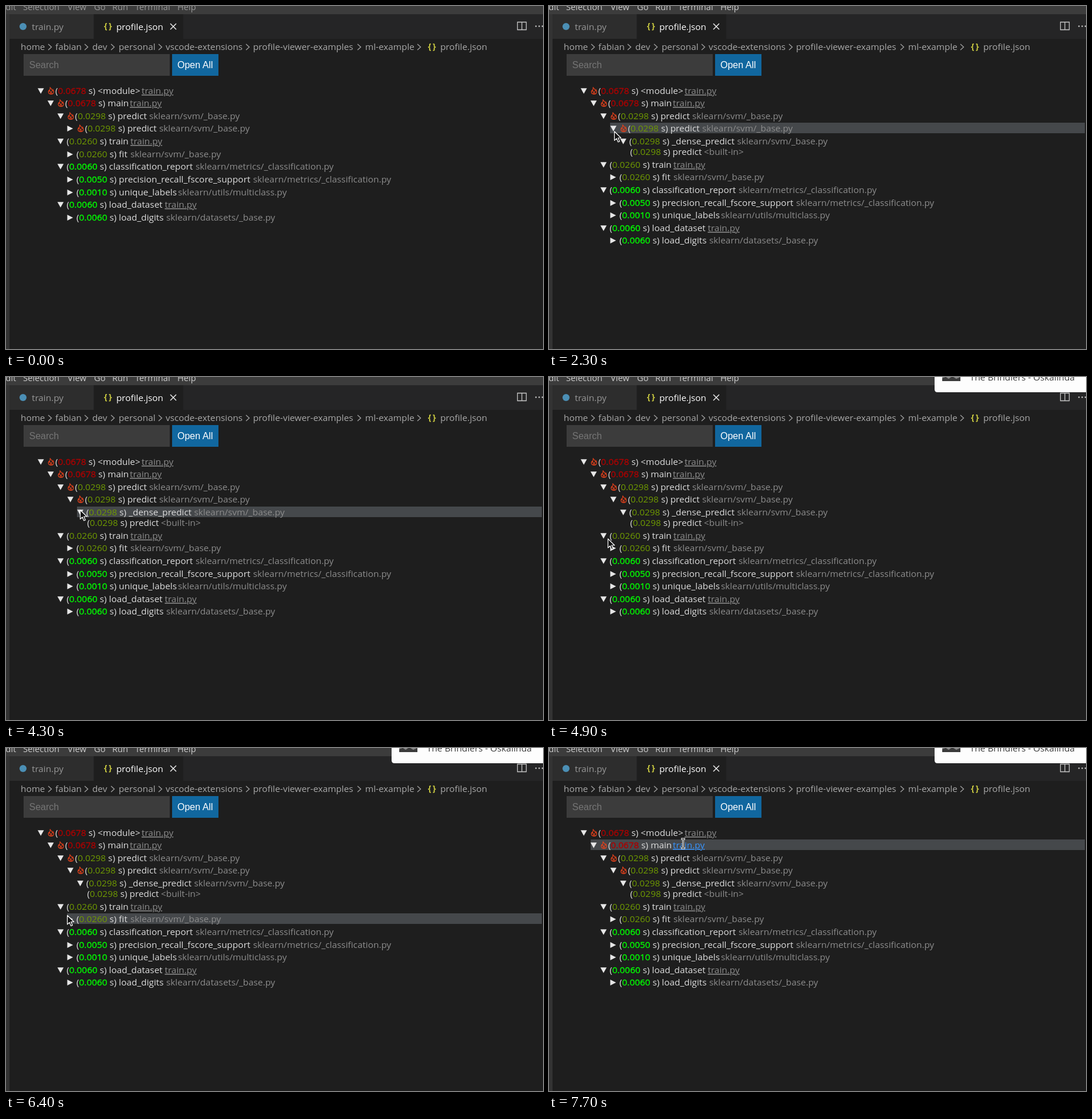
An HTML page that plays this animation: 915x585 px, repeating every 8 s.

```html
<!DOCTYPE html>
<html lang="en">
<head>
<meta charset="utf-8">
<title>Profile viewer</title>
<style>
  html, body { margin: 0; width: 100%; height: 100%; overflow: hidden; background: #1e1e1e; }
  svg { display: block; width: 915px; height: 585px; }
  text { font: 15.3px "Open Sans", "Noto Sans", sans-serif; white-space: pre; }
  .menu text { font-size: 14.7px; }
  .crumb { fill: #a9a9a9; }
  .json { font-weight: 700; font-size: 14px; letter-spacing: 2.6px; fill: #cbcb41; }
  .form { font: 16px "Liberation Sans", Arial, sans-serif; }
  .row text { font-size: 15.35px; fill: #dcdcdc; }
  .row .file { fill: #8c8c8c; }
  .row .link { text-decoration: underline; }
  .row .over { fill: #3794ff; }
  .strong { stroke-width: .35px; }
</style>
</head>
<body>
<svg id="stage" viewBox="0 0 915 585">
  <rect width="915" height="585" fill="#1e1e1e"/>
  <rect y="13" width="6" height="572" fill="#333"/>
  <rect x="6" y="13" width="909" height="43" fill="#252526"/>
  <rect x="6" y="13" width="143" height="43" fill="#2d2d2d"/>
  <rect x="150" y="13" width="152" height="43" fill="#1e1e1e"/>
  <rect width="915" height="14" fill="#3c3c3c"/>
  <g class="menu" id="menu"></g>

  <circle cx="29" cy="35" r="6" fill="#4b8fb5"/>
  <text x="44" y="41" fill="#979797">train.py</text>
  <text class="json" x="167" y="39">{}</text>
  <text x="188" y="41" fill="#fff">profile.json</text>
  <path d="M280 30l10 10M290 30l-10 10" stroke="#e8e8e8" stroke-width="1.5"/>
  <path d="M871.5 27.5h15v13h-15zM879 27.5v13" fill="none" stroke="#c5c5c5" stroke-width="1.3"/>
  <g fill="#c5c5c5"><circle cx="903" cy="34.5" r="1.3"/><circle cx="908.5" cy="34.5" r="1.3"/><circle cx="914" cy="34.5" r="1.3"/></g>

  <g id="crumbs"></g>
  <text class="json" x="719" y="74">{}</text>

  <rect x="30" y="82" width="249" height="37" fill="#3c3c3c"/>
  <text class="form" x="39.5" y="106" fill="#757575">Search</text>
  <rect x="283" y="82" width="79" height="37" fill="#11679f"/>
  <text class="form" x="292" y="106" fill="#fff">Open All</text>

  <rect id="mark" height="18" fill="#45484b"/>
  <g id="tree"></g>

  <g id="note">
    <path d="M657 -30H915V26H662q-5 0 -5 -5z" fill="#fdfdfd"/>
    <rect x="670" y="-24" width="31" height="31" fill="#8d8d8d"/>
    <path d="M670 7v-5l6 -2 5 3 6 -4 7 4 7 -3v7z" fill="#3b3b3b"/>
    <text x="717" y="6" fill="#3a3a3a">The Brindlers - Oskalinda</text>
  </g>

  <path id="arrow" d="M0 0V15.4L3.6 12 6.2 18 8.8 16.9 6.2 11H11.2z" fill="#111" stroke="#fff" stroke-width="1.2" stroke-linejoin="round"/>
  <g id="beam" fill="none">
    <path d="M-3.5 -8H3.5M0 -8V8M-3.5 8H3.5" stroke="#fff" stroke-width="3"/>
    <path d="M-3 -8H3M0 -8V8M-3 8H3" stroke="#111" stroke-width="1"/>
  </g>
</svg>
<script>
const LOOP = 8000;
const $ = id => document.getElementById(id);

function add(parent, tag, attrs, text) {
  const el = document.createElementNS("http://www.w3.org/2000/svg", tag);
  for (const k in attrs) el.setAttribute(k, attrs[k]);
  if (text !== undefined) el.textContent = text;
  parent.appendChild(el);
  return el;
}
const show = (el, on) => { el.style.display = on ? "" : "none"; };
const move = (el, x, y) => el.setAttribute("transform", `translate(${x} ${y})`);

[["Edit", -9], ["Selection", 29], ["View", 105], ["Go", 150], ["Run", 181], ["Terminal", 220], ["Help", 292]]
  .forEach(([s, x]) => add($("menu"), "text", { x, y: 7 }, s));

[["home", 25], ["fabian", 84], ["dev", 147], ["personal", 192], ["vscode-extensions", 272],
 ["profile-viewer-examples", 421], ["ml-example", 612], ["profile.json", 740]]
  .forEach(([s, x]) => add($("crumbs"), "text", { x, y: 75, class: "crumb" }, s));
[75, 137, 182, 263, 412, 602, 704].forEach(x => add($("crumbs"), "path",
  { d: `M${x - 3} 65l5.5 5 -5.5 5`, fill: "none", stroke: "#a0a0a0", "stroke-width": 1.3 }));

// Tree state over time
const within = (a, b) => t => t >= a && t < b;
const always = () => true, never = () => false;
const predictOpen = t => t >= 2300;
const denseOpen = t => predictOpen(t) && !within(3700, 4300)(t);
const fitOpen = within(5700, 6400);

const RED = "#ac0000", OLIVE = "#6f9a00", GREEN = "#00ff00";
const BASE = "sklearn/svm/_base.py", METRICS = "sklearn/metrics/_classification.py";
// id, level, seconds, colour, name, file, file x, shown, open (null for a leaf), hot
const rows = [
  ["module", 0, "0.0678", RED, "<module>", "train.py", 231, always, always, 1],
  ["main", 1, "0.0678", RED, "main", "train.py", 211, always, always, 1],
  ["predict", 2, "0.0298", OLIVE, "predict", BASE, 244, always, always, 1],
  ["inner", 3, "0.0298", OLIVE, "predict", BASE, 261, always, predictOpen, 1],
  ["dense", 4, "0.0298", OLIVE, "_dense_predict", BASE, 320.5, predictOpen, denseOpen],
  ["leaf", 5, "0.0298", OLIVE, "predict", "<built-in>", 264, denseOpen, null],
  ["train", 2, "0.0260", OLIVE, "train", "train.py", 212, always, always],
  ["fit", 3, "0.0260", OLIVE, "fit", BASE, 212, always, fitOpen],
  ["fitDense", 4, "0.0250", OLIVE, "_dense_fit", BASE, 290, fitOpen, never],
  ["check", 4, "0.0010", GREEN, "_validate_data", "sklearn/base.py", 318, fitOpen, never],
  ["report", 2, "0.0060", GREEN, "classification_report", METRICS, 323, always, always],
  ["score", 3, "0.0050", GREEN, "precision_recall_fscore_support", METRICS, 421, always, never],
  ["labels", 3, "0.0010", GREEN, "unique_labels", "sklearn/utils/multiclass.py", 293, always, never],
  ["load", 2, "0.0060", GREEN, "load_dataset", "train.py", 270.5, always, always],
  ["digits", 3, "0.0060", GREEN, "load_digits", "sklearn/datasets/_base.py", 273, always, never],
].map(([id, level, secs, colour, name, file, fileX, shown, open, hot]) => {
  const x = 54 + 16.8 * level;
  const g = add($("tree"), "g", { class: "row" });
  const tri = open && add(g, "path", { fill: "#e6e6e6" });
  if (hot) add(g, "path", {
    d: "M3.6 .5C4.2 3 7.6 4.2 8 7.2c.6 -.5 .8 -1.2 .8 -2C10.6 8.4 10.2 12.4 5.4 12.6C.6 12.6 -.2 8.6 1.6 6c.2 1 .6 1.6 1.2 1.8C2.6 5 4.4 3.4 3.6 .5zM5.4 12.4C3.4 11.4 3.8 9.4 5.4 8c.2 1.6 2.2 2.6 .8 4.4",
    transform: `translate(${x + 17.5} -7.2)`, fill: "none", stroke: "#e2401b", "stroke-width": 1.2 });
  const textX = x + (hot ? 30 : open ? 15.6 : 0.2);
  const label = add(g, "text", { x: textX, y: 5 }, "(");
  const num = add(label, "tspan", {}, secs);
  num.style.fill = colour;
  if (colour !== OLIVE) { num.style.stroke = colour; num.setAttribute("class", "strong"); }
  add(label, "tspan", {}, ` s) ${name}`);
  const link = add(g, "text", { x: fileX, y: 5, class: file === "train.py" ? "file link" : "file" }, file);
  return { id, x, g, tri, link, shown, open };
});

// Pointer steps: time, x, y, shape, row under it
const A = "arrow", I = "beam";
const steps = [
  [0, 0, 0, "", ""],
  [500, 420, 30, A, ""], [600, 365, 76, A, ""], [700, 305, 124, I, ""],
  [800, 236, 188, I, "predict"], [900, 190, 223, I, "train"], [1000, 165, 230, I, "train"],
  [1100, 150, 234, I, "train"], [1200, 140, 234, I, "train"], [1300, 134, 231, I, "train"],
  [1400, 130.5, 224, I, "train"], [1500, 126, 216, I, "inner"], [1600, 121, 214, I, "inner"],
  [1700, 115, 214, A, "inner"], [1800, 111.5, 214, A, "inner"],
  [2700, 115, 217, A, ""], [2800, 119, 219, A, "dense"],
  [3000, 123, 223, A, "dense"], [3100, 126.5, 227, A, "dense"],
  [4500, 121, 241, A, ""], [4600, 112, 257, A, ""], [4700, 105, 268, A, "train"],
  [4900, 100.5, 276, A, ""], [5000, 100.5, 281, A, ""], [5100, 101.5, 284, A, "fit"],
  [5200, 103, 285, A, "fit"], [5300, 104.5, 285.5, A, "fit"],
  [6800, 125, 252, I, ""], [6900, 140, 240, I, "dense"],
  [7100, 160, 250, I, ""], [7200, 178, 240, I, "dense"], [7300, 190, 226, I, "dense"],
  [7500, 206, 205, I, "inner"], [7600, 220, 182, I, "predict"], [7700, 228.5, 163, I, "main"],
];

function draw(t) {
  const [, px, py, shape, hover] = steps.findLast(s => s[0] <= t);
  show($("mark"), hover);
  let y = 144.7 - 21.6;
  for (const r of rows) {
    const on = r.shown(t);
    show(r.g, on);
    if (!on) continue;
    y += r.open ? 21.6 : 18;
    const cy = Math.round(y);
    move(r.g, 0, cy);
    if (r.tri) r.tri.setAttribute("d", r.open(t)
      ? `M${r.x} -4.8h10.6l-5.3 9.6z`
      : `M${r.x} -5l9.8 5 -9.8 5z`);
    if (r.id === hover) {
      $("mark").setAttribute("x", Math.round(r.x));
      $("mark").setAttribute("y", cy - 10);
      $("mark").setAttribute("width", 913 - Math.round(r.x));
    }
    r.link.classList.toggle("over", r.id === "main" && hover === "main");
  }
  for (const id of [A, I]) show($(id), id === shape);
  if (shape) move($(shape), px, py);
  $("menu").setAttribute("fill", t < 2100 ? "#989898" : "#cccccc");
  show($("note"), t >= 4500);
  move($("note"), 0, t < 4600 ? -18 : t < 4700 ? -7 : 0);
}

// The picture changes on tenths of a second
let last = -1;
const start = performance.now();
function tick() {
  const t = Math.floor(((performance.now() - start) % LOOP) / 100) * 100;
  if (t !== last) draw(last = t);
  requestAnimationFrame(tick);
}
tick();
</script>
</body>
</html>
```
